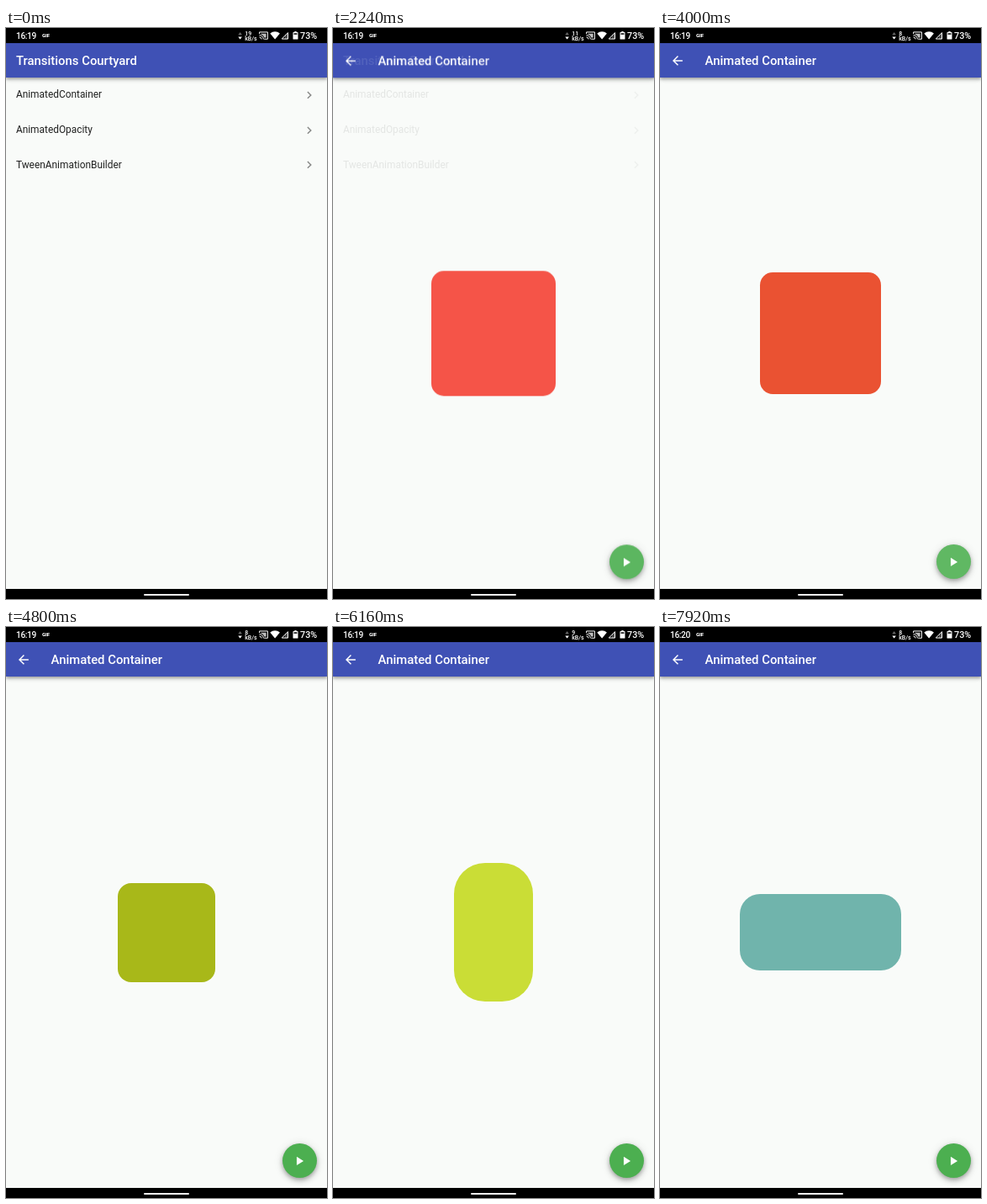
Animation of 382x680 px, one loop 8000 ms. Source, as an HTML page:

```html
<!DOCTYPE html>
<html lang="en">
<head>
<meta charset="utf-8">
<title>Animated Container</title>
<style>
  :root { --loop: 8000ms linear infinite; --std: cubic-bezier(.4, 0, .2, 1); }
  html, body { margin: 0; width: 100%; height: 100%; overflow: hidden; background: #000; }
  .stage {
    position: relative; width: 382px; height: 680px; overflow: hidden;
    font-family: Roboto, sans-serif; background: #000;
  }
  .stage svg { display: block; fill: currentColor; }
  .app { position: absolute; left: 0; top: 17.8px; width: 382px; height: 650.3px; overflow: hidden; }
  .page { position: absolute; inset: 0; background: #f9fbf9; }

  .bar {
    position: relative; height: 41.6px; background: #3f51b5; color: #fff;
    font-size: 14.86px; font-weight: 500; line-height: 42px; white-space: nowrap;
    box-shadow: 0 1.5px 3px rgba(0,0,0,.2), 0 3px 4px rgba(0,0,0,.14), 0 1px 7px rgba(0,0,0,.12);
  }
  .bar span { position: absolute; left: 12px; }
  .bar svg { position: absolute; left: 11.9px; top: 11.9px; }
  .bar svg + span { left: 53.6px; }

  .tile {
    position: relative; height: 41.6px; padding-left: 11.9px;
    font-size: 11.9px; line-height: 41.6px; color: rgba(0,0,0,.87);
  }
  .tile svg { position: absolute; right: 11.9px; top: 11.9px; color: rgba(0,0,0,.45); }

  .detail { animation: fade var(--loop), rise var(--loop); }
  .box {
    position: absolute; inset: 41.6px 0 0; margin: auto;
    animation: morph var(--loop);
  }
  .fab {
    position: absolute; right: 11.9px; bottom: 11.9px; width: 41.6px; height: 41.6px;
    border-radius: 50%; background: #4caf50; color: #fff;
    box-shadow: 0 2px 4px rgba(0,0,0,.2), 0 4px 7px rgba(0,0,0,.14), 0 1px 12px rgba(0,0,0,.12);
  }
  .fab::before {
    content: ""; position: absolute; inset: 0; border-radius: 50%;
    background: #fff; animation: press var(--loop);
  }
  .fab svg { position: absolute; left: 11.9px; top: 11.9px; }

  .status { position: absolute; left: 0; top: 0; color: #fff; font-weight: 500; }
  .pill {
    position: absolute; left: 164px; top: 673.5px; width: 53.5px; height: 2px;
    border-radius: 1px; background: #f4f4f4;
  }

  @keyframes fade {
    0% { opacity: 0; }
    24.475% { opacity: 0; animation-timing-function: ease-in; }
    28.225%, 100% { opacity: 1; }
  }
  @keyframes rise {
    0% { transform: translateY(25%); }
    24.475% { transform: translateY(25%); animation-timing-function: var(--std); }
    28.225%, 100% { transform: none; }
  }
  @keyframes morph {
    0%, 47.525% {
      width: 148.6px; height: 148.6px; border-radius: 15px; background: #f44336;
      animation-timing-function: cubic-bezier(.4, 0, .2, 1);
    }
    60.025%, 72.375% {
      width: 115.5px; height: 118px; border-radius: 16px; background: rgb(168, 184, 25);
      animation-timing-function: cubic-bezier(.4, 0, .2, 1);
    }
    84.875%, 87% {
      width: 77px; height: 202.8px; border-radius: 54px; background: rgb(229, 251, 78);
      animation-timing-function: cubic-bezier(.4, 0, .2, 1);
    }
    99.5%, 100% { width: 192px; height: 91.4px; border-radius: 24px; background: rgb(112, 180, 172); }
  }
  @keyframes press {
    0%, 45.4%, 52.2%, 67.4%, 76.4%, 87%, 92.2%, 100% { opacity: 0; }
    46.4%, 50.2%, 68.4%, 74.4%, 88%, 90.2% { opacity: .11; }
  }
</style>
</head>
<body>
<div class="stage">
  <svg width="0" height="0" style="position:absolute">
    <symbol id="next" viewBox="0 0 24 24"><path d="M8.6 16.6 13.2 12 8.6 7.4 10 6l6 6-6 6z"/></symbol>
    <symbol id="back" viewBox="0 0 24 24"><path d="M20 11H7.8l5.6-5.6L12 4l-8 8 8 8 1.4-1.4L7.8 13H20z"/></symbol>
    <symbol id="play" viewBox="0 0 24 24"><path d="M8 5v14l11-7z"/></symbol>
  </svg>

  <div class="app">
    <div class="page">
      <div class="bar"><span>Transitions Courtyard</span></div>
      <div class="tile">AnimatedContainer<svg width="17.8" height="17.8"><use href="#next"/></svg></div>
      <div class="tile">AnimatedOpacity<svg width="17.8" height="17.8"><use href="#next"/></svg></div>
      <div class="tile">TweenAnimationBuilder<svg width="17.8" height="17.8"><use href="#next"/></svg></div>
    </div>
    <div class="page detail">
      <div class="bar">
        <svg width="17.8" height="17.8"><use href="#back"/></svg>
        <span>Animated Container</span>
      </div>
      <div class="box"></div>
      <div class="fab"><svg width="17.8" height="17.8"><use href="#play"/></svg></div>
    </div>
  </div>

  <svg class="status" width="382" height="18">
    <text id="clock" x="12" y="12.8" font-size="10.2" letter-spacing="-.4">16:19</text>
    <text x="43" y="11.4" font-size="6" font-weight="900" letter-spacing="-.1">GIF</text>
    <path d="M276.3 8.2h4.6L278.6 5z" opacity=".4"/>
    <path d="M276.3 10.4h4.6l-2.3 3.2z"/>
    <text id="speed" x="284.2" y="8.5" font-size="7">19</text>
    <text x="284.2" y="14.8" font-size="7">kB/s</text>
    <g fill="none" stroke="currentColor">
      <path d="M301.6 7V4.9h9.8v8.3h-4.2"/>
      <path d="M301.5 8.6a4.8 4.8 0 0 1 4.8 4.8M301.5 10.9a2.5 2.5 0 0 1 2.5 2.5"/>
    </g>
    <path d="M303.4 6.8h6.2v4.6h-2.2a6 6 0 0 0-4-4z" opacity=".75"/>
    <path d="M314.3 6.5a8.6 8.6 0 0 1 11.6 0L320.1 13.6z"/>
    <path d="M328.3 13h7.2V5.6z" fill="none" stroke="currentColor"/>
    <path d="M331.8 13.2V9l3.8-3.8v8z" opacity=".3"/>
    <path d="M343.3 4h2.4v1h1.3q.5 0 .5.5v7.6q0 .5-.5.5h-5q-.5 0-.5-.5V5.500q0-.5.5-.5h1.300z"/>
    <path d="M342.500 6h4v2h-4z" fill="#000" opacity=".75"/>
    <text x="350" y="12.8" font-size="10.8">73%</text>
  </svg>
  <div class="pill"></div>
</div>
<script>
  const LOOP = 8000;
  const speeds = [[0, 19], [1120, 14], [2080, 11], [3120, 8], [6000, 9], [7040, 8]];
  const clock = document.getElementById('clock');
  const speed = document.getElementById('speed');
  const motion = document.querySelector('.box').getAnimations()[0];

  const setText = (node, value) => {
    if (node.textContent !== value) node.textContent = value;
  };

  function tick() {
    const t = (motion.currentTime || 0) % LOOP;
    setText(speed, String(speeds.filter(([from]) => from <= t).pop()[1]));
    setText(clock, t < 7840 ? '16:19' : '16:20');
    requestAnimationFrame(tick);
  }
  tick();
</script>
</body>
</html>
```
